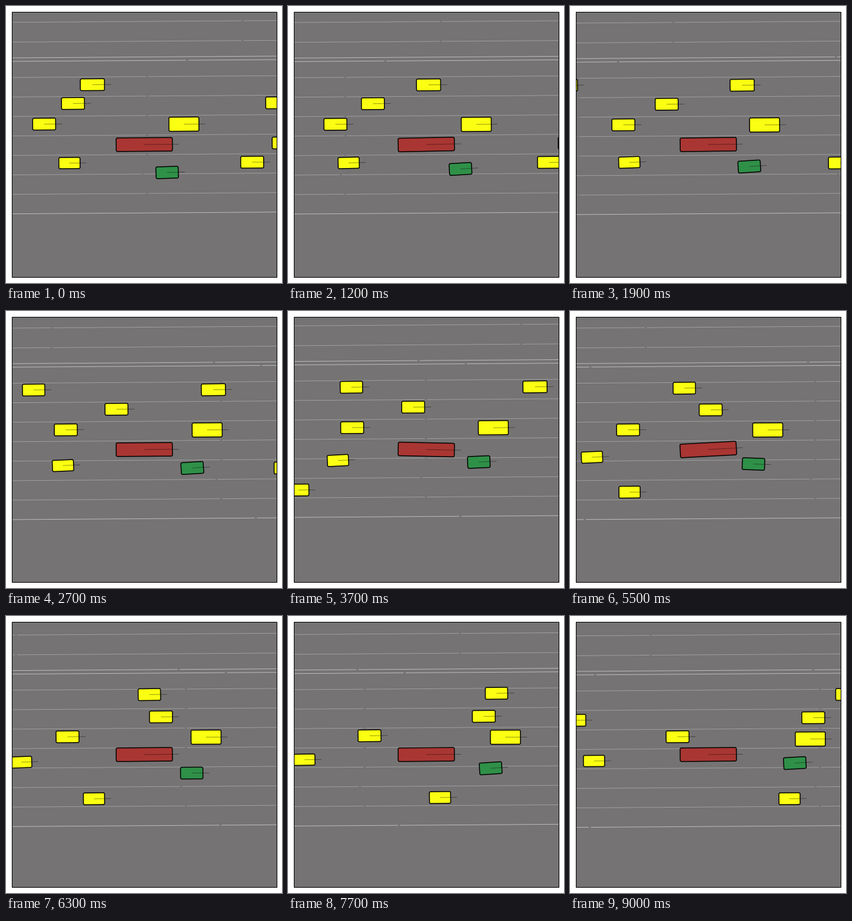
A matplotlib script for the animation above (9100 ms loop, 469 by 470 pixels).

```python
import math

import numpy as np
import matplotlib.pyplot as plt
from matplotlib.animation import FuncAnimation
from matplotlib.patches import FancyBboxPatch, Rectangle
from matplotlib.transforms import Affine2D

W, H, DPI = 469, 470, 64
FRAMES, STEP = 91, 100
PX = 72 / DPI
LEFT, RIGHT = 10, 460
SLOPE = -3 / 450
TILT = 0.45
LANE, BREAK = 33.05, 450.3

ROAD = "#757373"
YELLOW, RED, GREEN = "#fbff12", "#a93632", "#2f9048"


def shift(moves, t):
    """Sum of eased sideways moves, each (distance, start, end)."""
    total = 0
    for dist, start, end in moves:
        u = min(max((t - start) / (end - start), 0), 1)
        total += dist * u * u * (3 - 2 * u)
    return total


def travel(t):
    """Distance the view has driven, with a faster spell midway."""
    return 118 * t + 52 * (1 + math.tanh((t - 4.8) / 1.5))


SWAY = [(1.3, 0.8, 2), (-4.7, 2.7, 4.1), (8, 4.5, 6.3), (-0.9, 6.3, 7.5), (2.3, 7.7, 9)]


def drift(t):
    return shift(SWAY, t)


fig = plt.figure(figsize=(W / DPI, H / DPI), dpi=DPI, facecolor="white")
ax = fig.add_axes([0, 0, 1, 1])
ax.set(xlim=(0, W), ylim=(H, 0))
ax.axis("off")

box = (LEFT, LEFT), RIGHT - LEFT, RIGHT - LEFT
road = ax.add_patch(Rectangle(*box, fc=ROAD, ec="none", zorder=0))
ax.add_patch(Rectangle(*box, fc="none", ec="black", lw=1.1 * PX, zorder=9))


class Marking:
    """A lane line with small breaks at regular distances."""

    def __init__(self, y, first, bright=False):
        self.y, self.breaks = y, first + BREAK * np.arange(4)
        self.line, = ax.plot([], [], color="#c2c1c1" if bright else "#a3a2a2",
                             lw=0.95 * PX, solid_capstyle="butt", zorder=1)
        self.line.set_clip_path(road)

    def update(self, t):
        xs = [LEFT]
        for x in self.breaks - travel(t):
            if LEFT < x < RIGHT:
                xs += [x - 1.8, np.nan, x + 1.8]
        xs = np.array(xs + [RIGHT])
        self.line.set_data(xs, self.y + drift(t) + SLOPE * (xs - LEFT))


class Car:
    """A box that follows path(t) on the road and points along it."""

    def __init__(self, path, w=39, h=20, color=YELLOW):
        self.path = path
        self.body = ax.add_patch(FancyBboxPatch(
            (-w / 2, -h / 2), w, h, boxstyle="round,pad=0,rounding_size=2.3",
            fc=color, ec="black", lw=1.5 * PX, zorder=3))
        self.nose, = ax.plot([0, w / 2 + 11], [0, 0], color="black", alpha=0.4,
                             lw=1 * PX, solid_capstyle="butt", zorder=4)
        for part in (self.body, self.nose):
            part.set_clip_path(road)

    def update(self, t):
        x, y = self.path(t)
        (x0, y0), (x1, y1) = self.path(t - 0.05), self.path(t + 0.05)
        turn = math.degrees(math.atan2(y1 - y0, x1 - x0)) - TILT
        place = Affine2D().rotate_deg(turn).translate(x - travel(t), y + drift(t))
        for part in (self.body, self.nose):
            part.set_transform(place + ax.transData)


def drive(x, speed, accel, y, *moves):
    """Steady acceleration along the road plus eased lane changes."""
    return lambda t: (x + speed * t + accel * t * t / 2, y + shift(moves, t))


def ego(t):
    return 235 + travel(t), 235 - drift(t)


markings = [
    Marking(27.7, 402), Marking(61.3, 402),
    Marking(88, 678, True), Marking(94, 308, True),
    *[Marking(121.3 + LANE * k, 232 if k == 5 else 240) for k in range(7)],
    Marking(121.3 + LANE * 7, 749, True),
]

cars = [
    Car(drive(147, 194.4, 1.4, 133.5, (-3.1, 1, 5)), w=41),
    Car(drive(114, 141, 4.84, 165.4, (1.2, 3, 6))),
    Car(drive(65, 130, 2.8, 200.4, (-1.5, 6, 9))),
    Car(drive(108, 113.5, 1.9, 266.5, (-26.5, 0.5, 8)), w=36, h=19),
    Car(drive(302.5, 132, 2.06, 200.5, (2.5, 5, 10)), w=51, h=24),
    Car(drive(418.5, 138.2, 2.2, 265)),
    Car(drive(461, 146, 3, 164.3)),
    Car(drive(472, 121, 5.4, 232.3)),
    Car(drive(-131.5, 182, 3.2, 133.5, (-6.5, 1, 9)), w=38),
    Car(drive(-215, 180, 3.3, 306.2, (-2.2, 5, 8.5)), w=36),
    Car(drive(-465, 182, 0, 171)),
    Car(drive(274, 133.6, 1.76, 283.7, (-28.3, -0.7, 4.9), (6.5, 4.8, 6.3),
              (-22.4, 6.3, 10)), w=38, color=GREEN),
    Car(ego, w=95.5, h=23, color=RED),
]


def draw(i):
    t = i * STEP / 1000
    for item in markings + cars:
        item.update(t)
    return []


anim = FuncAnimation(fig, draw, frames=FRAMES, interval=STEP, repeat=True,
                     repeat_delay=0, blit=False)
plt.show()
```
